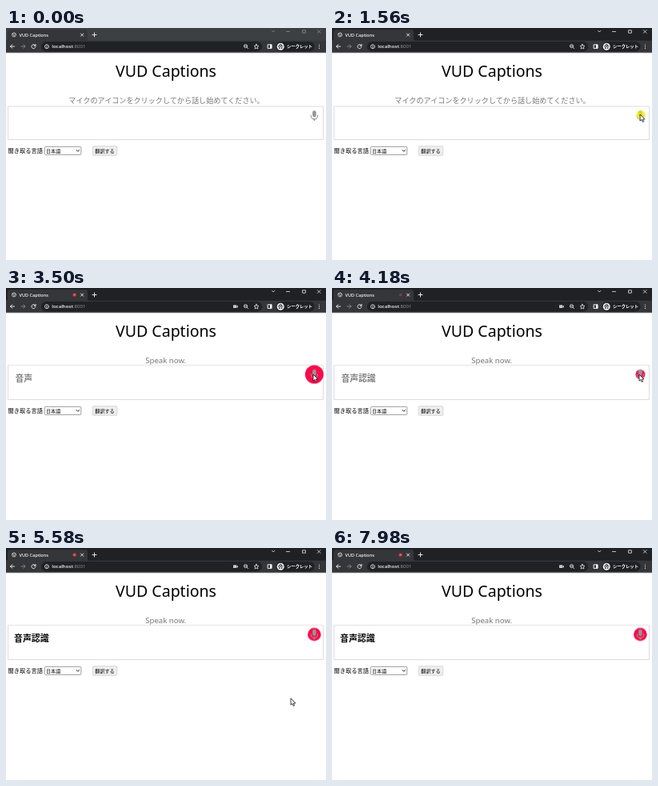
These frames come from a looping animation (400x290 px, 8.06 s). An HTML page:

```html
<!DOCTYPE html>
<html lang="ja">
<head>
<meta charset="utf-8">
<title>VUD Captions</title>
<style>
html, body { margin: 0; width: 100%; height: 100%; overflow: hidden; background: #fff; }
svg { display: block; width: 400px; height: 290px; }
text { font-family: "Noto Sans CJK JP", "Noto Sans CJK", sans-serif; }
.ui { font-family: "Open Sans", "Noto Sans", sans-serif; font-weight: 600; }
.thin { font-family: "Noto Sans", "Open Sans", Roboto, sans-serif; font-weight: 300; font-stretch: 62.5%; }
.mid { text-anchor: middle; }
.line { fill: none; stroke-width: 1; stroke-linecap: round; stroke-linejoin: round; }
</style>
</head>
<body>
<svg viewBox="0 0 400 290">
  <defs>
    <g id="mic" fill="#969696">
      <rect x="-2.3" y="-6.5" width="4.6" height="8.2" rx="2.3"/>
      <path d="M-4.1 -1 V.4 A4.1 3.8 0 0 0 4.1 .4 V-1" fill="none" stroke="#969696" stroke-width="1.1"/>
      <path d="M-.7 3.8 H.7 V6.4 H-.7z"/>
    </g>
  </defs>

  <!-- browser frame -->
  <rect id="strip" width="400" height="17" fill="#3c4043"/>
  <path d="M0 16 Q2 16 2 13.5 V5 Q2 2 5 2 H99 Q102 2 102 5 V13.5 Q102 16 104 16z" fill="#35363a"/>
  <rect y="15.7" width="400" height="15" fill="#35363a"/>
  <rect y="30.5" width="400" height=".7" fill="#5a5b5f"/>
  <g class="line" stroke="#b9bcc0" stroke-width=".8">
    <circle cx="10" cy="8.5" r="2.5"/>
    <path d="M8 7.5 l2.2 .8 v2 M10.5 6.3 l1.6 1.4"/>
  </g>
  <text class="ui" x="16.6" y="10.7" font-size="5.5" fill="#f1f3f4">VUD Captions</text>
  <g id="rec">
    <circle cx="85.6" cy="8.6" r="2.6" fill="#8c2f2f"/>
    <circle cx="85.6" cy="8.6" r="1.5" fill="#e2605a"/>
  </g>
  <g class="line" stroke="#e3e5e8">
    <path d="M93.5 7 l3.2 3.2 m0 -3.2 l-3.2 3.2 M108 8.5 h5 M110.5 6 v5"/>
    <path d="M10.5 23 h-5 m2.2 -2.2 l-2.2 2.2 l2.2 2.2"/>
    <path d="M19 23 h5 m-2.2 -2.2 l2.2 2.2 l-2.2 2.2" stroke="#808287"/>
    <path d="M36.7 22 a2.5 2.5 0 1 0 .2 1.8 M37 20.4 v1.8 h-1.8"/>
  </g>
  <g id="controls" class="line" stroke="#e8eaed">
    <path d="M332.5 3.3 l1.7 1.7 l1.7 -1.7 M350.5 4.5 h4 M371 2.8 h3.4 v3.4 h-3.4z M389.3 2.6 l3.8 3.8 m0 -3.8 l-3.8 3.8" stroke-width=".8"/>
  </g>
  <rect x="44" y="17" width="276" height="12.4" rx="6.2" fill="#202124"/>
  <g class="line" stroke="#c4c7cb" stroke-width=".8">
    <circle cx="51" cy="23.2" r="2.5"/>
    <path d="M51 23 v1.4 M51 21.8 v.1"/>
    <circle cx="299.5" cy="22.6" r="2.1"/>
    <path d="M301.2 24.2 l1.4 1.5 M298.6 22.6 h1.8"/>
    <path d="M313 20.2 l.9 2 2.1 .2 -1.6 1.5 .5 2.1 -1.9 -1.1 -1.9 1.1 .5 -2.1 -1.6 -1.5 2.1 -.2z"/>
  </g>
  <text class="ui" x="57.2" y="25.4" font-size="6.1" fill="#f1f3f4">localhost<tspan fill="#92969b" font-weight="400">:8001</tspan></text>
  <g id="cam" fill="#c4c7cb"><rect x="284" y="21.3" width="4.4" height="3.8" rx=".6"/><path d="M288 23.2 l2 -1.5 v3z"/></g>
  <path d="M327.5 20.8 h4.5 v4.6 h-4.5z" class="line" stroke="#f1f3f4"/>
  <rect x="330" y="20.8" width="2.2" height="4.6" fill="#f1f3f4"/>
  <rect x="337.6" y="17" width="48" height="12.4" rx="6.2" fill="#202124"/>
  <circle cx="343.2" cy="23.2" r="4.5" fill="#f1f3f4"/>
  <path d="M340.3 22.8 h5.8 M341.7 22 l.6 -1.6 h1.8 l.6 1.6z" class="line" stroke="#3c4043" stroke-width=".7"/>
  <circle cx="341.8" cy="24.9" r="1" fill="#3c4043"/><circle cx="344.6" cy="24.9" r="1" fill="#3c4043"/>
  <text x="351" y="25.2" font-size="5.35" font-weight="700" fill="#fff">シークレット</text>
  <g fill="#e3e5e8"><circle cx="391.5" cy="21" r=".6"/><circle cx="391.5" cy="23.2" r=".6"/><circle cx="391.5" cy="25.4" r=".6"/></g>

  <!-- page -->
  <text class="thin mid" x="200" y="61" font-size="19.5">VUD Captions</text>
  <text id="ask" class="mid" x="200.5" y="93.6" font-size="9.1" fill="#777">マイクのアイコンをクリックしてから話し始めてください。</text>
  <text id="speak" class="thin mid" x="199.7" y="94" font-size="9.6" fill="#777">Speak now.</text>

  <g id="lower">
    <path d="M2.5 110 V139.5 H396.5 V110" fill="none" stroke="#ddd"/>
    <text x="2.6" y="156" font-size="7.25">聞き取る言語</text>
    <rect x="48.4" y="148.4" width="45.4" height="10" rx="1" fill="#fff" stroke="#767676" stroke-width=".7"/>
    <text x="50" y="155.8" font-size="6.1">日本語</text>
    <path d="M88 152.5 l1.8 1.8 l1.8 -1.8" class="line" stroke="#222"/>
    <rect x="108.2" y="147.8" width="30.6" height="11.4" rx="1" fill="#efefef" stroke="#c8c8c8" stroke-width=".7"/>
    <text x="111.3" y="155.8" font-size="6.1">翻訳する</text>
  </g>
  <g id="upper">
    <path d="M2.5 112 V98 H396.5 V112" fill="none" stroke="#ddd"/>
    <circle id="pulse" cx="385.4" cy="109.5" r="1" fill="#fa0a4b"/>
    <use href="#mic" x="385.4" y="109.7"/>
  </g>
  <g font-size="10.8" font-weight="700" fill="#808080">
    <text id="half" x="11.4" y="116.6">音声</text>
    <text id="whole" x="11.4" y="116.6">音声認識</text>
    <text id="final" x="10" y="116.6" font-size="10.9" fill="#000">音声認識</text>
  </g>
  <circle id="click" cx="386" cy="108.5" r="5.6" fill="#f3ee00" opacity=".72"/>
  <g id="cursor">
    <path d="M0 0 V8.2 L1.9 6.5 L3.2 9.5 L4.6 8.9 L3.3 6 H5.9z" fill="#fff" stroke="#000" stroke-width=".75"/>
  </g>
</svg>
<script>
const LOOP = 8060;

// rows: [ms, value, easing to the next row]
function run(id, prop, rows) {
  const hold = "steps(1, end)";
  const frames = rows.map(([ms, v, easing = hold]) => ({ offset: ms / LOOP, [prop]: v, easing }));
  frames.push({ offset: 1, [prop]: rows.at(-1)[1] });
  document.getElementById(id).animate(frames, { duration: LOOP, iterations: Infinity });
}

function show(id, from, to = LOOP, on = 1) {
  const rows = from ? [[0, 0], [from, on]] : [[0, on]];
  if (to < LOOP) rows.push([to, 0]);
  run(id, "opacity", rows);
}

const at = (x, y) => `translate(${x}px, ${y}px)`;

run("strip", "fill", [[0, "#3c4043"], [1560, "#202124"]]);
run("controls", "opacity", [[0, .45], [1560, 1]]);
show("ask", 0, 1640);
show("speak", 1900);
show("cam", 1900);
show("half", 3340, 3740);
show("whole", 3740, 5330);
show("final", 5330);
show("click", 1560, 1730, .72);

run("upper", "transform", [[0, at(0, 0)], [1640, at(0, -1.5)]]);
run("lower", "transform", [[0, at(0, 0)], [1640, at(0, -1.5)], [3340, at(0, 0)]]);

run("rec", "opacity", [[0, 0], [1900, .3, "linear"], [2060, 1], [2460, 1, "linear"], [2820, .1, "linear"],
  [3180, 1], [3740, 1, "linear"], [4080, .1, "linear"], [4420, 1]]);

// the microphone ring breathes through four sizes
const [XS, S, M, L] = [5, 6, 8.3, 11.5];
const sizes = [L, M, S, XS, S, M];
const beats = [2220, 2460, 2620, 2780, 2960, 3180, 3340, 3580, 3740, 4000, 4170, 4420, 4580, 4830,
  5000, 5160, 5410, 5580, 5840, 5920, 6170, 6330, 6500, 6740, 6990, 7160, 7320, 7570, 7730, 7980];
run("pulse", "r", [[0, "0px"], [1900, S + "px"], [2060, M + "px"],
  ...beats.map((ms, i) => [ms, sizes[i % 6] + "px"])]);

run("cursor", "transform", [
  [0, at(386, 300)], [500, at(386, 271), "cubic-bezier(.3, 0, .3, 1)"], [1140, at(385.2, 108)],
  [1900, at(384, 108)], [5160, at(384, 108), "ease-in-out"], [5410, at(356, 188)],
  [7160, at(356, 188), "ease-out"], [7320, at(360, 187)],
  [7730, at(360, 187), "ease-in"], [7970, at(362, 300)]]);
</script>
</body>
</html>
```
